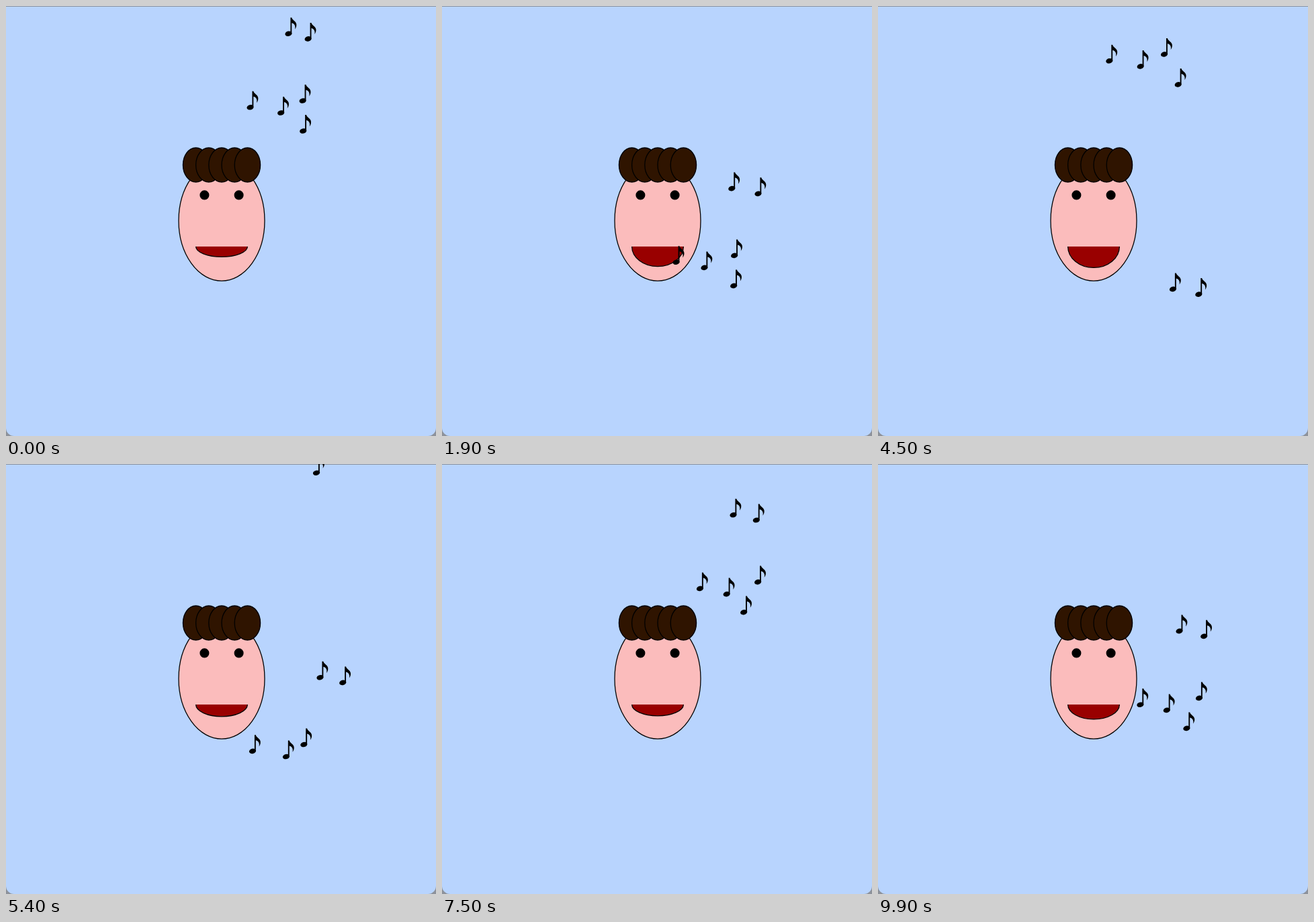
Animation of 640 by 640 pixels, one loop 10 s. Source, as an HTML page with a canvas:

```html
<!DOCTYPE html>
<html>
<head>
<meta charset="utf-8">
<style>
  html, body { margin: 0; width: 100%; height: 100%; overflow: hidden; background: #8d929b; }
  canvas { display: block; }
</style>
</head>
<body>
<canvas id="stage" width="640" height="640"></canvas>
<script>
const ctx = document.getElementById('stage').getContext('2d');
const LOOP = 10000, STEP = 100;
const CX = 321;
const RISE = 11.52;       // px each note climbs per step
const SPAN = 449.3;       // height a note travels before it starts again
const BASE = 26;          // note top to its baseline
const WAVE = 0.05 / 1.28; // sway, radians per px of height
const SWAY = 17.07;
const DRIFT = 14;         // sideways shift gained on every restart

// starting x and top of each note
const notes = [
  [417.6, 17.2], [451.7, 24.9], [342.4, 126.8],
  [387.2, 135], [423.7, 117], [429, 162]
];

const noteShape = new Path2D('M7.8 0H9.7C10.2 4 16.3 5 16.7 10.2C16.9 13.2 15.8 15.6 14.4 17.2' +
  'C15.6 13.2 14.2 9 9.7 8V23.5H7.8Z');
noteShape.ellipse(4.9, 24, 5.2, 3.7, -0.25, 0, Math.PI * 2);

function oval(x, y, rx, ry, fill, end = Math.PI * 2) {
  ctx.beginPath();
  ctx.ellipse(x, y, rx, ry, 0, 0, end);
  ctx.fillStyle = fill;
  ctx.fill();
  ctx.stroke();
}

function drawNote(x0, top, step) {
  const raw = top + BASE - RISE * step;
  const wraps = Math.max(0, Math.ceil((-2 - raw) / SPAN));
  const base = raw + wraps * SPAN;
  const x = x0 + SWAY * Math.cos(WAVE * base) + DRIFT * wraps;
  ctx.save();
  ctx.translate(x, base - BASE);
  ctx.fillStyle = '#000';
  ctx.fill(noteShape);
  ctx.restore();
}

function draw(step) {
  ctx.clearRect(0, 0, 640, 640);
  ctx.fillStyle = '#b8d4fe';
  ctx.beginPath();
  ctx.roundRect(0, 1, 640, 639, [0, 0, 12, 12]);
  ctx.fill();

  ctx.strokeStyle = '#000';
  ctx.lineWidth = 1.28;
  oval(CX, 319.6, 64, 89.6, '#fbbcbc');
  for (const side of [-1, 1]) oval(CX + side * 25.6, 281.4, 6.4, 6.4, '#000');
  for (let i = -2; i <= 2; i++) oval(CX + i * 19.2, 236.6, 19.2, 25.6, '#2f1400');

  const open = 22.2 + 9.6 * Math.sin(3.94 + 0.5 * step);
  oval(CX, 358, 38.4, open, '#990000', Math.PI);

  for (const [x, top] of notes) drawNote(x, top, step);
}

const start = performance.now();
function tick() {
  draw(Math.floor((performance.now() - start) % LOOP / STEP));
  requestAnimationFrame(tick);
}
tick();
</script>
</body>
</html>
```
